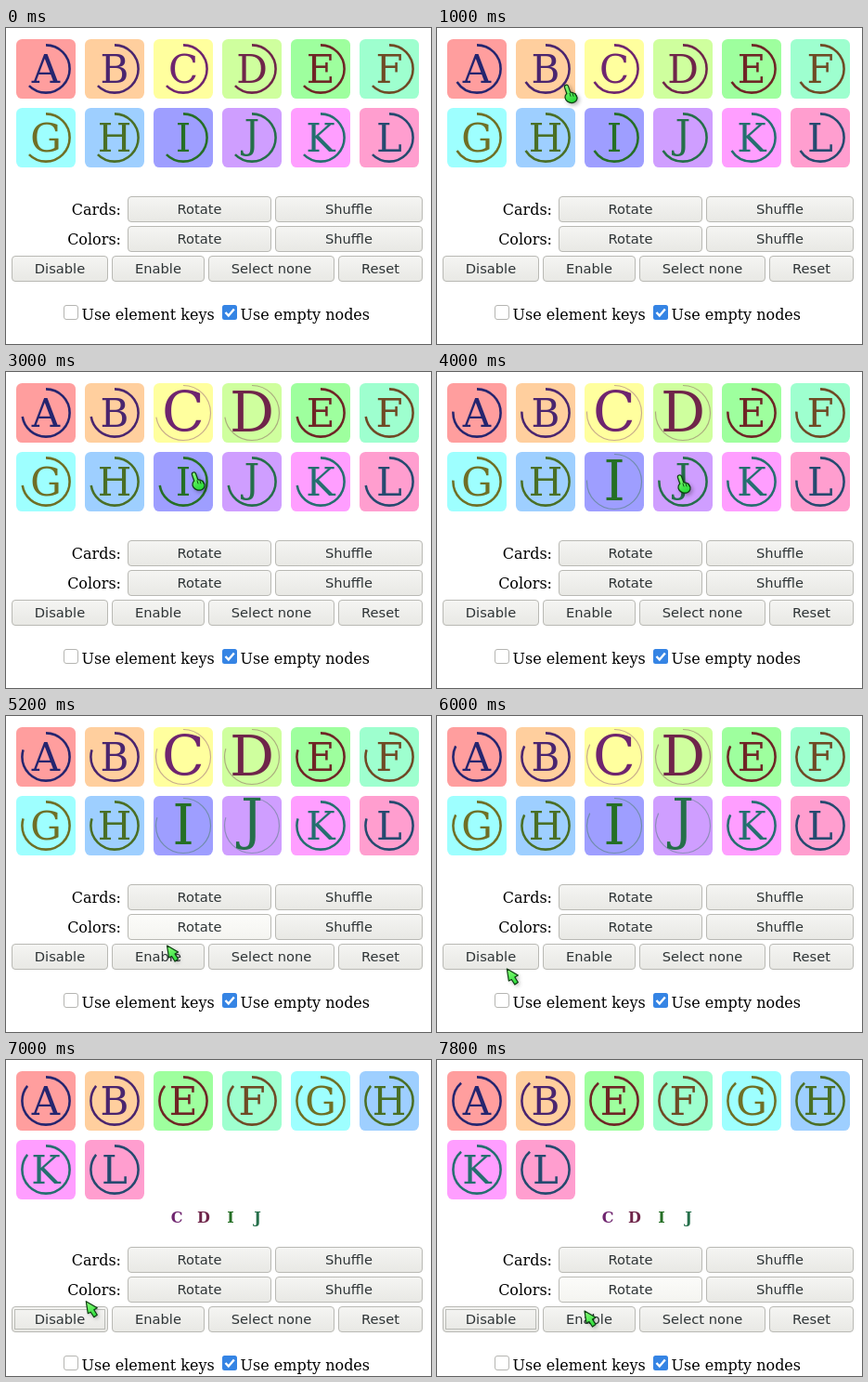
Write an HTML page with a canvas that moves like this. It is 458x340 px and loops after 8 s.

```html
<!DOCTYPE html>
<html lang="en">
<head>
<meta charset="utf-8">
<title>Card selection</title>
<style>
html, body { margin: 0; width: 100%; height: 100%; overflow: hidden; background: #fff; }
canvas { display: block; width: 458px; height: 340px; }
</style>
</head>
<body>
<canvas id="stage" width="458" height="340"></canvas>
<script>
const ctx = document.getElementById('stage').getContext('2d');
const LOOP = 8000, STEP = 200, TRAVEL = 700, REMOVED_AT = 7000;
const CARD = 64, PITCH = 74;
const SERIF = '16px "DejaVu Serif", serif';
const SANS = '14.667px "DejaVu Sans", sans-serif';
const LETTERS = [...'ABCDEFGHIJKL'];
const CLICKS = { C: 1700, D: 2500, I: 3100, J: 4150 };

// Pointer stops; each is reached after a straight move of at most TRAVEL ms
const STOPS = [
  { at: 600, x: 8, y: 100 },
  { at: 1200, x: 203, y: 42 },
  { at: 2500, x: 272, y: 41 },
  { at: 3000, x: 201, y: 108 },
  { at: 4000, x: 260, y: 111 },
  { at: 5140, x: 187, y: 240 },
  { at: 5600, x: 84, y: 294 },
  { at: 6200, x: 71, y: 261 },
  { at: 7600, x: 178, y: 252 },
  { at: 7800, x: 159, y: 270 }
];

// Button rows; widths follow from the captions and the padding
const ROWS = [
  { label: 'Cards:', left: 131, pad: 107.5, names: ['Rotate', 'Shuffle'] },
  { label: 'Colors:', left: 131, pad: 107.5, names: ['Rotate', 'Shuffle'] },
  { label: '', left: 5.6, pad: 50, names: ['Disable', 'Enable', 'Select none', 'Reset'] }
];

const lerp = (a, b, p) => a + (b - a) * p;
const clamp = p => Math.max(0, Math.min(1, p));
const easeInOut = p => p < 0.5 ? 4 * p ** 3 : 1 - (2 - 2 * p) ** 3 / 2;
const ink = i => `hsl(${240 + 30 * i}, 50%, 29%)`;

function text(str, x, y, font, color, align = 'left') {
  ctx.font = font;
  ctx.fillStyle = color;
  ctx.textAlign = align;
  ctx.fillText(str, x, y);
}

function box(x, y, w, h, r, fill, stroke) {
  ctx.beginPath();
  ctx.roundRect(x, y, w, h, r);
  ctx.fillStyle = fill;
  ctx.fill();
  if (stroke) {
    ctx.strokeStyle = stroke;
    ctx.lineWidth = 1;
    ctx.stroke();
  }
}

function pointerAt(t) {
  if (t < STOPS[0].at) return null;
  const k = STOPS.findIndex(s => s.at > t);
  if (k < 0) return STOPS[STOPS.length - 1];
  const from = STOPS[k - 1], to = STOPS[k];
  const span = Math.min(TRAVEL, to.at - from.at);
  const p = clamp(1 - (to.at - t) / span);
  return { x: lerp(from.x, to.x, p), y: lerp(from.y, to.y, p) };
}

function drawCard(i, slot, t) {
  const x = 11 + PITCH * (slot % 6), y = 12 + PITCH * Math.floor(slot / 6);
  const cx = x + CARD / 2, cy = y + CARD / 2;
  const p = easeInOut(clamp((t - (CLICKS[LETTERS[i]] ?? Infinity)) / 450));

  box(x, y, CARD, CARD, CARD / 10, `hsl(${30 * i}, 100%, 81%)`);

  const font = `${lerp(42, 60, p)}px "DejaVu Serif", serif`;
  ctx.font = font;
  const m = ctx.measureText(LETTERS[i]);
  const drop = (m.actualBoundingBoxAscent - m.actualBoundingBoxDescent) / 2;
  text(LETTERS[i], cx, cy + drop - lerp(0.5, 2.5, p), font, ink(i), 'center');

  const end = (135 + 12 * t / 1000) * Math.PI / 180;
  ctx.globalAlpha = lerp(1, 0.38, p);
  ctx.strokeStyle = ink(i);
  ctx.lineWidth = lerp(CARD * 0.04, 1.2, clamp(p * 15));
  ctx.beginPath();
  ctx.arc(cx, cy, lerp(CARD * 0.4, 29.5, p), -Math.PI / 2, end);
  ctx.stroke();
  ctx.globalAlpha = 1;
}

function drawButton(name, x, y, w, hover) {
  const face = ctx.createLinearGradient(0, y, 0, y + 28);
  face.addColorStop(0, hover ? '#fcfcfa' : '#f5f5f3');
  face.addColorStop(1, hover ? '#f4f4f0' : '#e8e8e4');
  box(x + 0.5, y + 0.5, w - 1, 27, 3.5, face, '#b9b9b4');
  text(name, x + w / 2, y + 19, SANS, '#2e3436', 'center');
}

function drawRow({ label, left, pad, names }, y, spot) {
  text(label, 124, y + 20, SERIF, '#000', 'right');
  for (const name of names) {
    ctx.font = SANS;
    const right = left + ctx.measureText(name).width + pad;
    const x = Math.round(left), w = Math.round(right) - x;
    const hover = spot && spot.x >= x && spot.x < x + w && spot.y >= y && spot.y < y + 28;
    drawButton(name, x, y, w, hover);
    left = right + 4;
  }
}

function drawOption(x, label, checked) {
  if (checked) {
    box(x, 298, 16, 16, 2.5, '#3584e4');
    ctx.strokeStyle = '#fff';
    ctx.lineWidth = 2.4;
    ctx.beginPath();
    ctx.moveTo(x + 3.5, 306);
    ctx.lineTo(x + 6.8, 309.5);
    ctx.lineTo(x + 12.8, 302.5);
    ctx.stroke();
  } else {
    box(x + 0.5, 298.5, 15, 15, 2.5, '#fff', '#b5b5b2');
  }
  text(label, x + 19.5, 314, SERIF, '#000');
}

function drawControls(t, shift) {
  const spot = pointerAt(t - STEP); // hover trails the pointer
  const local = spot && { x: spot.x, y: spot.y - shift };
  ctx.save();
  ctx.translate(0, shift);
  ROWS.forEach((row, i) => drawRow(row, 181 + 32 * i, local));
  if (shift) {
    ctx.setLineDash([1, 1]);
    ctx.strokeStyle = '#888a85';
    ctx.strokeRect(9.5, 248.5, 97, 21);
    ctx.setLineDash([]);
  }
  drawOption(62, 'Use element keys', false);
  drawOption(233, 'Use empty nodes', true);
  ctx.restore();
}

function line(x0, y0, x1, y1, width, color) {
  ctx.strokeStyle = color;
  ctx.lineWidth = width;
  ctx.beginPath();
  ctx.moveTo(x0, y0);
  ctx.lineTo(x1, y1);
  ctx.stroke();
}

function drawHand(fill, edge) {
  for (const [grow, color] of [[1.2, edge], [0, fill]]) {
    line(1.5, 2, 5, 12, 3 + 2 * grow, color);
    ctx.fillStyle = color;
    ctx.beginPath();
    ctx.ellipse(6.5, 13.5, 6 + grow, 5 + grow, 0.3, 0, 2 * Math.PI);
    ctx.fill();
    ctx.shadowColor = 'transparent';
  }
  for (let x = 5; x < 12; x += 3) line(x, 9, x + 1, 12, 0.9, edge);
}

function drawArrow(fill, edge) {
  const shape = new Path2D('M0 0 L12 7 L8.5 9 L12 14.5 L8.5 17 L5 11.5 L2 13 Z');
  ctx.fillStyle = fill;
  ctx.fill(shape);
  ctx.shadowColor = 'transparent';
  ctx.strokeStyle = edge;
  ctx.lineWidth = 1.2;
  ctx.stroke(shape);
}

function drawPointer(t) {
  const spot = pointerAt(t);
  if (!spot) return;
  ctx.save();
  ctx.translate(spot.x, spot.y);
  ctx.lineCap = ctx.lineJoin = 'round';
  ctx.shadowColor = 'rgba(0,0,0,.3)';
  ctx.shadowBlur = 4;
  ctx.shadowOffsetX = ctx.shadowOffsetY = 2;
  const green = ctx.createLinearGradient(0, 0, 10, 18);
  green.addColorStop(0, '#8dff7a');
  green.addColorStop(1, '#24d936');
  (spot.y < 150 ? drawHand : drawArrow)(green, '#0b3d10');
  ctx.restore();
}

function draw(t) {
  const removed = t >= REMOVED_AT;
  ctx.fillStyle = '#fff';
  ctx.fillRect(0, 0, 458, 340);
  let slot = 0, picked = 0;
  LETTERS.forEach((letter, i) => {
    if (removed && CLICKS[letter]) {
      text(letter, 184 + 29 * picked++, 175, `bold ${SERIF}`, ink(i), 'center');
    } else {
      drawCard(i, slot++, t);
    }
  });
  drawControls(t, removed ? 20 : 0);
  drawPointer(t);
}

const origin = performance.now();
function tick() {
  const t = Math.max(0, performance.now() - origin) % LOOP;
  draw(Math.floor(t / STEP) * STEP);
  requestAnimationFrame(tick);
}
tick();
</script>
</body>
</html>
```
